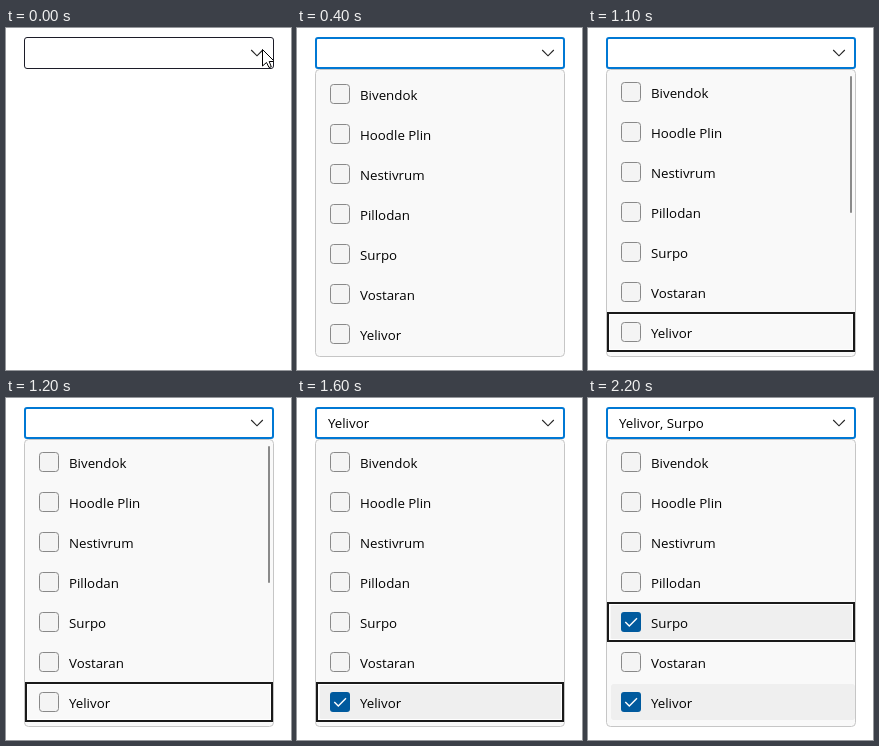
Write an HTML page with a canvas that moves like this. It is 285 px wide and 342 px high and loops after 2.7 s.

```html
<!DOCTYPE html>
<html lang="en">
<head>
<meta charset="utf-8">
<title>Multi-select dropdown</title>
<style>
  html, body { margin: 0; width: 100%; height: 100%; overflow: hidden; background: #fff; }
  canvas { display: block; width: 285px; height: 342px; }
</style>
</head>
<body>
<canvas id="stage"></canvas>
<script>
const W = 285, H = 342, LOOP = 2700;
const items = ['Bivendok', 'Hoodle Plin', 'Nestivrum', 'Pillodan', 'Surpo', 'Vostaran', 'Yelivor'];
const canvas = document.getElementById('stage');
const ctx = canvas.getContext('2d');
const dpr = window.devicePixelRatio || 1;
canvas.width = W * dpr;
canvas.height = H * dpr;

// Each step changes part of the state from its time on.
const steps = [
  { at: 0, open: false, cursor: true, scroll: 0, bar: 0, focus: -1, checked: [], tick: 1 },
  { at: 300, open: true },
  { at: 400, cursor: false },
  { at: 800, focus: 5, bar: 1 },
  { at: 1000, scroll: 1 },
  { at: 1100, scroll: 2, focus: 6 },
  { at: 1500, checked: [6], tick: 0.5, bar: 0.5 },
  { at: 1600, tick: 1, bar: 0 },
  { at: 2000, focus: 4, bar: 1 },
  { at: 2200, checked: [6, 4], bar: 0 }
];

function stateAt(t) {
  return Object.assign({}, ...steps.filter(s => s.at <= t));
}

function box(x, y, w, h, r, fill, stroke, line = 1) {
  const d = stroke ? line / 2 : 0;
  ctx.beginPath();
  ctx.roundRect(x + d, y + d, w - 2 * d, h - 2 * d, r);
  if (fill) {
    ctx.fillStyle = fill;
    ctx.fill();
  }
  if (stroke) {
    ctx.strokeStyle = stroke;
    ctx.lineWidth = line;
    ctx.stroke();
  }
}

function trace(points) {
  ctx.beginPath();
  points.forEach(([x, y]) => ctx.lineTo(x, y));
}

function label(text, x, y) {
  ctx.fillStyle = '#000';
  ctx.fillText(text, x, y);
}

function drawField(s) {
  if (s.open) box(18, 9, 250, 32, 2, '#fff', '#0078d4', 2);
  else box(18, 9, 250, 32, 2.5, '#fff', '#1c1c28');
  label(s.checked.map(i => items[i]).join(', '), 31, 30);
  trace([[245.2, 22], [251, 27.8], [256.8, 22]]);
  ctx.strokeStyle = '#222';
  ctx.lineWidth = 1.1;
  ctx.stroke();
}

function drawCheck(y, on, tick) {
  if (!on) {
    box(33, y - 10, 20, 20, 3, '#f4f4f4', '#898989');
    return;
  }
  box(33, y - 10, 20, 20, 3, '#005a9e');
  ctx.save();
  ctx.beginPath();
  ctx.rect(36, y - 6, 14 * tick, 12);
  ctx.clip();
  trace([[37.3, y], [41.3, y + 4], [49, y - 3.7]]);
  ctx.strokeStyle = '#fff';
  ctx.lineWidth = 1.4;
  ctx.stroke();
  ctx.restore();
}

function drawList(s) {
  box(18, 41, 250, 288, 4, '#f9f9f9', '#c6c6c6');
  items.forEach((name, i) => {
    const y = 66 + 40 * i - s.scroll;
    const on = s.checked.includes(i);
    if (on) box(23, y - 18, 244, 36, 3, '#efefef');
    drawCheck(y, on, s.tick);
    label(name, 63, y + 6);
    if (i === s.focus) {
      box(21, y - 18, 244, 36, 0, null, '#fff');
      box(19, y - 20, 248, 40, 0, null, '#1a1a1a', 2);
    }
  });
  if (s.bar) {
    ctx.globalAlpha = s.bar;
    box(262, 47 + s.scroll / 2, 2, 137, 1, '#8a8a8a');
    ctx.globalAlpha = 1;
  }
}

function drawCursor() {
  trace([[256.5, 21.5], [256.5, 38], [260.5, 34.5], [263, 39.5],
    [265.3, 38.8], [263.2, 33.5], [267.5, 33.5], [267.5, 32.5]]);
  ctx.closePath();
  ctx.fillStyle = '#fff';
  ctx.fill();
  ctx.strokeStyle = '#000';
  ctx.lineWidth = 1;
  ctx.stroke();
}

function draw(t) {
  const s = stateAt(t);
  ctx.setTransform(dpr, 0, 0, dpr, 0, 0);
  ctx.fillStyle = '#fff';
  ctx.fillRect(0, 0, W, H);
  ctx.font = '13.3px "Open Sans", "Noto Sans", sans-serif';
  if (s.open) drawList(s);
  drawField(s);
  if (s.cursor) drawCursor();
}

const start = performance.now();
function frame() {
  draw((performance.now() - start) % LOOP);
  requestAnimationFrame(frame);
}
frame();
</script>
</body>
</html>
```
